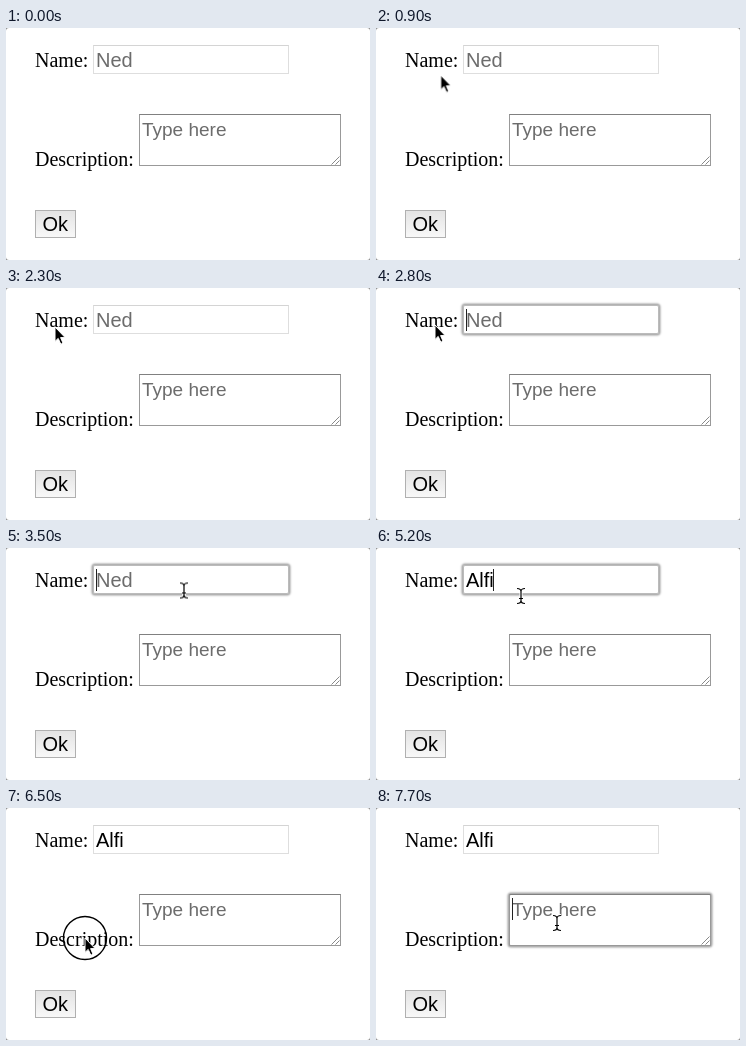
Recreate the animation shown at these times as an HTML page. Size 364x232 px, loop 8 s.

```html
<!DOCTYPE html>
<html lang="en">
<head>
<meta charset="utf-8">
<title>Form labels</title>
<style>
html, body { margin: 0; width: 100%; height: 100%; overflow: hidden; background: #8a8a8a; }
.stage { position: absolute; inset: 0; background: #fff; border-radius: 3px; overflow: hidden; }
.stage * { position: absolute; box-sizing: border-box; animation: 8s -20ms step-end infinite; }

label, span { white-space: pre; }
label { left: 29px; font: 20px/22px "Liberation Serif", "Times New Roman", serif; color: #000; }
span { font: 20px/22px "Liberation Sans", Arial, sans-serif; color: #6c6c6c; }

.box { border: 1px solid; background: #fff; }
.ring { border: 1px solid; border-radius: 2px; box-shadow: 0 0 2px 1.5px #a4a4a4; opacity: 0; }
.name { left: 87px; top: 17px; width: 196px; height: 29px; border-color: #d4d4d4 #dedede #dedede; }
.desc { left: 133px; top: 86px; width: 202px; height: 52px; border-color: #808080 #999 #999; }
.name.ring { border-color: #bbb; }
.ok { left: 29px; top: 182px; width: 41px; height: 28px; border: 1px solid #b0b0b0; background: linear-gradient(#e4e4e4, #f8f8f8); }

.hint { left: 90px; top: 21px; }
.typed { left: 90px; top: 21px; width: 1px; height: 22px; overflow: hidden; color: #000; border-right: 1px solid transparent; }
.caret { left: 136px; top: 90px; width: 1px; height: 22px; background: #222; opacity: 0; }

.name.ring { animation-name: name-focus; }
.desc.ring { animation-name: desc-focus; }
.hint { animation-name: hint; }
.typed { animation-name: type, blink; }
.caret { animation-name: desc-caret; }
.pointer { left: 0; top: 0; width: 0; height: 0; animation-name: move; }
.pointer svg { left: -24px; top: -24px; width: 48px; height: 48px; opacity: 0; }
.pointer .ripple { animation-name: press; }
.pointer .arrow { animation-name: arrow; }
.pointer .beam { animation-name: beam; }
.beam path { fill: none; stroke: #000; stroke-width: 1.2; d: path("M-4-7.5Q0-7.5 0-4.5Q0-7.5 4-7.5M0-5V5M-4 7.5Q0 7.5 0 4.5Q0 7.5 4 7.5M-2 2.5H2"); }
.beam .halo { stroke: #fff; stroke-width: 3; }

/* 1.25% is one 100 ms step */
@keyframes name-focus { 0% { opacity: 0 } 30% { opacity: 1 } 71.25%, 100% { opacity: 0 } }
@keyframes desc-focus {
  0% { opacity: 0 } 73.75% { opacity: 1 } 81.25% { opacity: 0 } 83.75%, 100% { opacity: 1 }
}
@keyframes desc-caret {
  0% { opacity: 0 } 73.75% { opacity: 1 } 80% { opacity: 0 }
  83.75% { opacity: 1 } 90% { opacity: 0 } 96.25%, 100% { opacity: 1 }
}
@keyframes hint { 0% { opacity: 1 } 48.75%, 100% { opacity: 0 } }
@keyframes type {
  0% { width: 1px } 48.75% { width: 14.3px } 53.75% { width: 18.8px }
  57.5% { width: 24.3px } 58.75%, 100% { width: 28.3px }
}
@keyframes blink {
  0% { border-color: transparent } 30% { border-color: #222 } 36.25% { border-color: transparent }
  42.5% { border-color: #222 } 66.25%, 100% { border-color: transparent }
}
@keyframes press {
  0%, 16.25%, 28.75%, 73.75%, 83.75%, 100% { opacity: 0 }
  13.75%, 26.25%, 71.25%, 81.25% { opacity: 1 }
}
@keyframes arrow {
  0%, 37.5%, 90%, 100% { opacity: 0 }
  5%, 66.25% { opacity: 1 }
}
@keyframes beam {
  0%, 50%, 66.25% { opacity: 0 }
  37.5%, 65%, 90%, 100% { opacity: 1 }
}
@keyframes move {
  0% { transform: translate(94px, 83px) }
  5% { transform: translate(94px, 83px); animation-timing-function: steps(7) }
  13.75% { transform: translate(53px, 33px) }
  18.75% { transform: translate(53px, 33px); animation-timing-function: steps(2) }
  21.25% { transform: translate(41px, 36px); animation-timing-function: steps(4) }
  26.25% { transform: translate(49px, 39px) }
  35% { transform: translate(59px, 37px); animation-timing-function: steps(7) }
  43.75% { transform: translate(178px, 42.5px) }
  65% { transform: translate(145px, 48px); animation-timing-function: steps(5) }
  71.25% { transform: translate(65px, 130px) }
  75% { transform: translate(65px, 130px); animation-timing-function: steps(3) }
  78.75% { transform: translate(70px, 139px); animation-timing-function: steps(2) }
  81.25% { transform: translate(79px, 130px) }
  86.25% { transform: translate(79px, 130px); animation-timing-function: steps(4) }
  91.25%, 100% { transform: translate(181px, 115px) }
}
</style>
</head>
<body>
<div class="stage">
  <label style="top:21px">Name:</label>
  <div class="box name"></div>
  <div class="ring name"></div>
  <span class="hint">Ned</span>
  <span class="typed">Alfi</span>

  <label style="top:120px">Description:</label>
  <div class="box desc"></div>
  <div class="ring desc"></div>
  <span style="left:136px;top:91px;font-size:19px">Type here</span>
  <div class="caret"></div>
  <svg style="left:324px;top:127px" width="10" height="10" stroke="#888"><path d="M1.5 9.5l8-8M5.5 9.5l4-4"/></svg>

  <div class="ok"></div>
  <span style="left:36.5px;top:185px;color:#000">Ok</span>

  <div class="pointer">
    <svg class="ripple" viewBox="-24 -24 48 48"><circle r="21.5" fill="none" stroke="#000" stroke-width="1.4"/></svg>
    <svg class="arrow" viewBox="-24 -24 48 48"><path d="M0 0V14.4L3.2 11.4L5.8 17.2L8 16.2L5.6 10.6H10.2Z" stroke="#fff"/></svg>
    <svg class="beam" viewBox="-24 -24 48 48"><path class="halo"/><path/></svg>
  </div>
</div>
</body>
</html>
```
